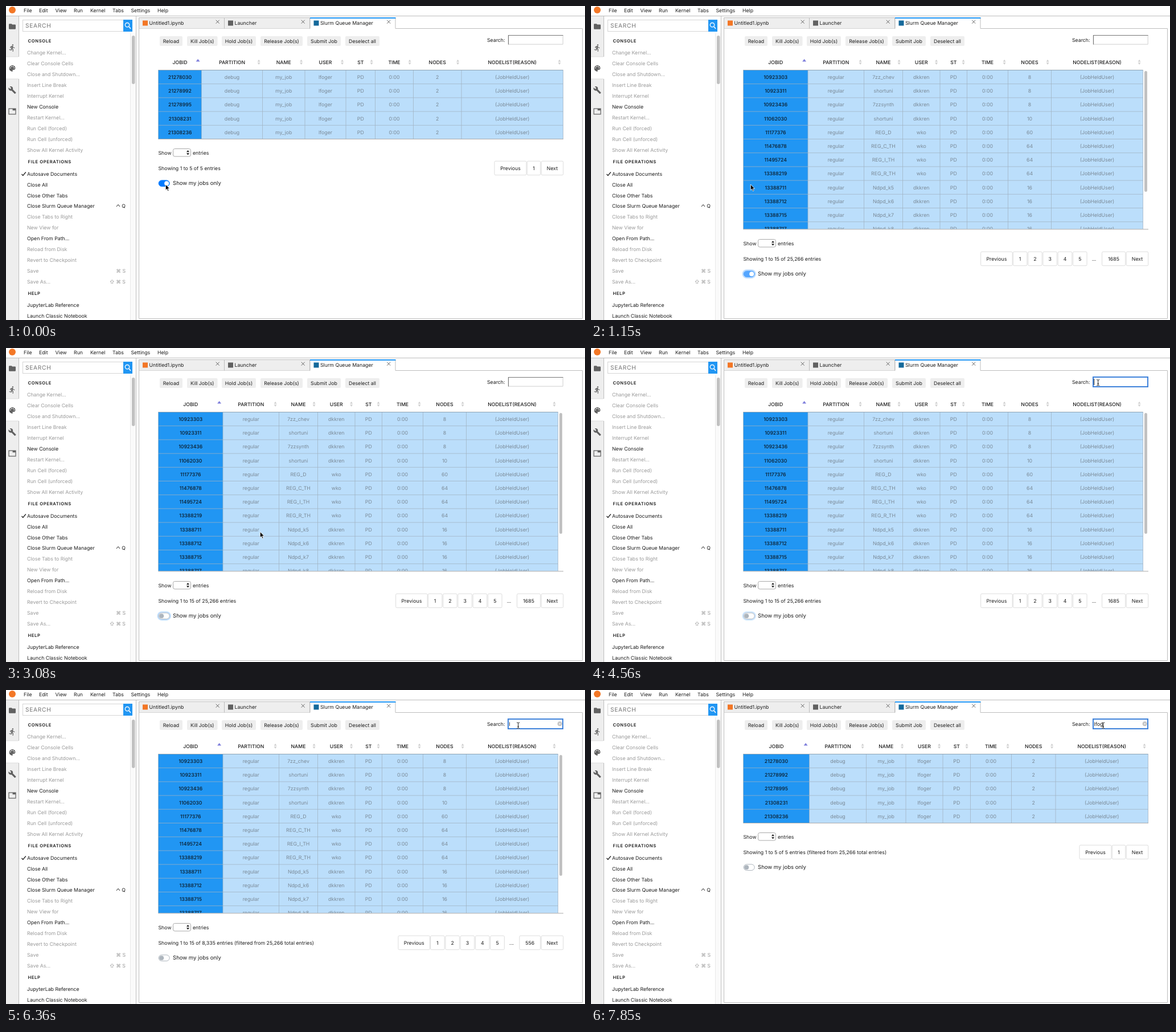
An HTML page that plays this animation: 1017 by 551 pixels, repeating every 8000 ms.

```html
<!DOCTYPE html>
<html lang="en">
<head>
<meta charset="utf-8">
<title>Slurm Queue Manager</title>
<style>
html, body { margin: 0; width: 100%; height: 100%; overflow: hidden; background: #fff; }
svg { display: block; font-family: Inter, "Liberation Sans", sans-serif; text-rendering: geometricPrecision; white-space: pre; }
</style>
</head>
<body>
<svg width="1017" height="551" viewBox="0 0 1017 551">
  <clipPath id="body"><rect x="267" y="112" width="713" height="279.5"/></clipPath>
  <g id="shell"></g>
  <g id="view"></g>
</svg>
<script>
const INK = '#1c1c1c', DIM = '#999', LINE = '#bdbdbd', BLUE = '#2196f3';
const LOOP = 8000, SIZE = 8.75;

// y is the vertical middle of the text
const text = (x, y, s, { fill = INK, size = SIZE, anchor = 'start', weight = 400, gap = 0 } = {}) =>
  `<text x="${x}" y="${y + size * .363}" fill="${fill}" font-size="${size}" font-weight="${weight}" text-anchor="${anchor}" letter-spacing="${gap}">${s}</text>`;
const mid = (x, y, s, opt) => text(x, y, s, { anchor: 'middle', ...opt });
const rect = (x, y, w, h, fill, more = '') =>
  `<rect x="${x}" y="${y}" width="${w}" height="${h}" fill="${fill}" ${more}/>`;
const path = (d, fill, more = '') => `<path d="${d}" fill="${fill}" ${more}/>`;
const line = (d, stroke = LINE, width = 1, more = '') =>
  path(d, 'none', `stroke="${stroke}" stroke-width="${width}" ${more}`);
const dot = (x, y, r, fill) => `<circle cx="${x}" cy="${y}" r="${r}" fill="${fill}"/>`;
const at = (x, y, s, k = 1) => `<g transform="translate(${x} ${y}) scale(${k})">${s}</g>`;
const icon = (x, y, s, k = .6) => at(x - 12 * k, y - 12 * k, s, k);

function menuBar() {
  const items = [[31, 'File'], [58, 'Edit'], [86.5, 'View'], [119, 'Run'], [148, 'Kernel'],
    [187, 'Tabs'], [219.5, 'Settings'], [266, 'Help']];
  return dot(11, 7, 6, '#f37726') + items.map(([x, s]) => text(x, 7.6, s)).join('') + line('M0 17.5H1017');
}

function activityBar() {
  const c = '#616161';
  const holes = [[6.5, 10.5], [9.5, 6.5], [14.5, 6.5], [17.5, 10.5]].map(([x, y]) => dot(x, y, 1.5, '#fff')).join('');
  return rect(0, 18, 22, 533, '#eee') + rect(0, 89, 23, 39, '#fff') +
    line('M22.5 18V89M22.5 128V551') + line('M0 89H22M0 128H22', '#ddd') +
    icon(11, 36, path('M10 4H4a2 2 0 0 0-2 2v12a2 2 0 0 0 2 2h16a2 2 0 0 0 2-2V8a2 2 0 0 0-2-2h-8z', c)) +
    icon(11, 73.5, dot(13.5, 3.5, 2, c) + path('M9.9 19.4l1-4.4 2.1 2v6h2v-7.5l-2.1-2 .6-3c1.3 1.5 3.3 2.5 5.5 2.5v-2c-1.9 0-3.5-1-4.3-2.4l-1-1.6c-.4-.6-1-1-1.7-1-.3 0-.5.1-.8.1L6 8.3V13h2V9.6l1.8-.7L8.2 17l-4.9-1-.4 2z', c)) +
    icon(11, 109.5, path('M12 3a9 9 0 0 0 0 18c1.3 0 2-1.400 1.100-2.500-.9-1.100-.200-2.500 1.100-2.500H16a5 5 0 0 0 5-5c0-4.400-4-8-9-8z', c) + holes) +
    icon(11, 147.500, path('M22.700 19l-9.100-9.100c.9-2.300.4-5-1.500-6.900-2-2-5-2.400-7.400-1.300L9 6 6 9 1.600 4.700C.4 7.100.9 10.100 2.900 12.100c1.900 1.900 4.600 2.400 6.900 1.500l9.100 9.100c.4.4 1 .4 1.400 0l2.300-2.300c.5-.4.5-1.100.1-1.400z', c)) +
    icon(11, 185, path('M1 3h22v18H1zM3 5v14h18V9h-8V5z', c, 'fill-rule="evenodd"'));
}

// A leading "-" marks a disabled command
function palette() {
  const groups = [
    ['CONSOLE', 61, 82, ['-Change Kernel...', '-Clear Console Cells', '-Close and Shutdown...',
      '-Insert Line Break', '-Interrupt Kernel', 'New Console', '-Restart Kernel...',
      '-Run Cell (forced)', '-Run Cell (unforced)', '-Show All Kernel Activity']],
    ['FILE OPERATIONS', 273, 294.5, ['Autosave Documents', 'Close All', 'Close Other Tabs',
      'Close Slurm Queue Manager', '-Close Tabs to Right', '-New View for', 'Open From Path...',
      '-Reload from Disk', '-Revert to Checkpoint', '-Save', '-Save As...']],
    ['HELP', 504, 525, ['JupyterLab Reference', 'Launch Classic Notebook']],
  ];
  const keys = { anchor: 'end', fill: DIM };
  let s = rect(29.5, 24.500, 177, 20, '#fff', 'stroke="#d5d5d5"') +
    text(34, 34.5, 'SEARCH', { fill: '#757575', size: 10.2, gap: .7 }) +
    rect(206, 24, 16, 21, BLUE) +
    line('M215.8 36.300L219 39.800', '#fff', 1.5) + `<circle cx="213" cy="33.2" r="3.700" fill="none" stroke="#fff" stroke-width="1.300"/>`;
  for (const [title, ty, y, items] of groups) {
    s += text(38.5, ty, title, { size: 7.6, weight: 600, gap: .68 });
    items.forEach((item, i) => {
      const off = item[0] === '-';
      s += text(37, y + i * 18.93, off ? item.slice(1) : item, { fill: off ? DIM : INK });
    });
  }
  return s + line('M27.500 295l2.300 2.500 5-6', INK, 1.200) +
    line('M194 352l3-3.500 3 3.500', INK) + text(210, 351.3, 'Q', { anchor: 'end' }) +
    text(210, 464.900, '⌘ S', keys) + text(210, 483.800, '⇧ ⌘ S', keys) +
    rect(219, 48, 9, 503, '#fafafa') + line('M218.5 48V551', '#e8e8e8') +
    rect(221, 52, 5.5, 85, '#c1c1c1', 'rx="2.700"') + line('M228.5 18V551');
}

function tabs() {
  const list = [[233.5, 'Untitled1.ipynb', '#f37726'], [383.5, 'Launcher', '#616161'], [534, 'Slurm Queue Manager', '#15699b']];
  return line('M233.5 39V548.5H1012.5V39.5H233') + list.map(([x, s, c], i) => {
    const on = i === 2;
    return rect(x, 20.5, 150, on ? 20 : 19, on ? '#fff' : '#eee') +
      line(`M${x} 39.5V20.5H${x + 150}V39.5`) + (on ? rect(x, 20, 150.500, 2, BLUE) : '') +
      rect(x + 6.500, 25.500, 9, 9, c) + text(x + 18, 30, s) +
      line(`M${x + 135.200} 24.700l6 6m0-6l-6 6`, '#555', .9);
  }).join('');
}

function toolbar() {
  const buttons = [[270, 40, 'Reload'], [318, 53.5, 'Kill Job(s)'], [379, 60, 'Hold Job(s)'],
    [447, 74, 'Release Job(s)'], [529, 59, 'Submit Job'], [596, 60, 'Deselect all']];
  return buttons.map(([x, w, s]) => rect(x, 53, w, 17, '#eee', 'rx="2"') + mid(x + w / 2, 61.7, s)).join('') +
    text(845, 60, 'Search:');
}

const heads = ['JOBID', 'PARTITION', 'NAME', 'USER', 'ST', 'TIME', 'NODES', 'NODELIST(REASON)'];
const edges = {
  mine: [267.5, 343.5, 450.5, 525, 597, 648.5, 715.5, 800, 978.5],
  all: [267.5, 381, 479.5, 547.5, 613, 660.5, 732.5, 808.5, 969.5],
  found: [267.5, 383.5, 483.5, 553, 618, 666.5, 738.5, 816, 978.5],
};
const job = (id, queue, name, user, nodes) => [id, queue, name, user, 'PD', '0:00', nodes, '(JobHeldUser)'];
const ownJobs = [21278030, 21278992, 21278995, 21308231, 21308236].map(id => job(id, 'debug', 'my_job', 'lfoger', 2));
const allJobs = [
  [10923303, '7zz_chev', 8], [10923311, 'shortuni', 8], [10923436, '7zzsynth', 8], [11062030, 'shortuni', 10],
  [11177376, 'REG_D', 60], [11476878, 'REG_C_TH', 64], [11495724, 'REG_I_TH', 64], [13388219, 'REG_R_TH', 64],
  [13388711, 'Ndpd_k5', 16], [13388712, 'Ndpd_k6', 16], [13388715, 'Ndpd_k7', 16], [13388717, 'Ndpd_k8', 16],
].map(([id, name, n]) => job(id, 'regular', name, name.startsWith('REG') ? 'wko' : 'dkkren', n));

function table(xs, rows, bottom) {
  const h = 24.2, top = 112.5, end = xs[8], low = top + rows.length * h;
  let head = '', cells = '', grid = '';
  heads.forEach((name, c) => {
    const x = (xs[c] + xs[c + 1]) / 2, sort = xs[c + 1] - 6.4;
    head += mid(x, 98.7, name, { weight: 500, size: 8.7 }) + at(sort, 98.5, c
      ? path('M-2.500 -.8L0 -4.500 2.500 -.8zM-2.500 .8L0 4.500 2.500 .8z', '#d0d0d0')
      : path('M-3.500 -1L0 -5.500 3.500 -1z', '#7d7ddb'));
    rows.forEach((row, r) => cells += mid(x, top + h * (r + .5) + .3, row[c],
      c ? { fill: '#7a8996' } : { fill: '#0c1a26', weight: 500, size: 8.7 }));
  });
  xs.forEach(x => grid += `M${x} ${top}V${low}`);
  rows.forEach((_, r) => grid += `M${xs[0]} ${top + r * h}H${end}`);
  return head + `<g clip-path="url(#body)">` +
    rect(xs[0], top, end - xs[0], low - top, '#bbdefb') + rect(xs[0], top, xs[1] - xs[0], low - top, BLUE) +
    line(grid, '#a0b2c2', 1, 'opacity=".75"') + cells + '</g>' +
    line(`M267.500 112.500H${end}`, '#8fa3b3') + line(`M267.500 ${bottom}H979`, '#aaa');
}

const pageButton = (x, y, w, s) =>
  rect(x - w / 2, y - 12.300, w, 24.500, '#fff', 'rx="2" stroke="#ddd"') + mid(x, y, s);

function pager(y, last) {
  let s = pageButton(959.5, y, 38.5, 'Next');
  if (!last) return s + pageButton(927, y, 23.5, 1) + pageButton(886, y, 56, 'Previous');
  const w = last > 999 ? 41 : 36.7, left = 938.6 - w;
  s += pageButton(left + w / 2, y, w, last) + mid(left - 14, y, '...');
  for (let k = 1; k <= 5; k++) s += pageButton(left - 38.8 - 26.3 * (5 - k), y, 24.5, k);
  return s + pageButton(left - 185.2, y, 55.5, 'Previous');
}

function toggle(y, { fill, knob, on, ring }) {
  return (ring ? rect(266.7, y - 6.800, 22, 13.600, 'none', `rx="6.800" stroke="#007bff" stroke-width="2.400" opacity="${ring}"`) : '') +
    rect(268.2, y - 5.300, 19, 10.600, fill, `rx="5.300" stroke="${on ? fill : '#adb5bd'}"`) +
    dot(on ? 282.2 : 273.2, y, 4, knob) + text(293, y - .6, 'Show my jobs only', { size: 9.55 });
}

function toggleState(t) {
  if (t < 1300) return {
    on: true, knob: '#fff', ring: t < 260 ? 0 : .25,
    fill: t < 860 ? '#007bff' : t < 1150 ? '#2b91ff' : '#55a6ff',
  };
  return { on: false, knob: '#adb5bd', fill: '#fff', ring: t < 4560 ? .25 : t < 4710 ? .2 : 0 };
}

function footer(y, info, last, state) {
  const row = y + 24.500;
  return text(267.5, row, 'Show') + rect(293.5, row - 7, 31, 13.500, '#fff', 'rx="3" stroke="#a9a9a9"') +
    path(`M317 ${row - 1.200}l2.500 -3.300 2.500 3.300zM317 ${row + .8}l2.500 3.300 2.500 -3.300z`, INK) + text(328, row, 'entries') +
    text(267.5, y + 51.5, info) + pager(y + 51.5, last) + toggle(y + 78.2, state);
}

const ctx = document.createElement('canvas').getContext('2d');
ctx.font = '8.9px Inter, "Liberation Sans", sans-serif';

function searchBox(t) {
  const n = [5910, 6500, 6950, 7400].filter(k => t >= k).length;
  const typed = 'lfog'.slice(0, n);
  const caret = [[4560, 5010], [5610, 6360], [6500, 7850]].some(([a, b]) => t >= a && t < b);
  let s = t < 4560
    ? rect(882, 51, 96.5, 16.5, '#fff') + line('M978.200 51V67.200H882', '#cfcfcf') + line('M882.500 67.500V51.500H978.500', '#767676', 1.200)
    : rect(882, 51, 96, 17, '#fff', 'stroke="#3f82da" stroke-width="2"');
  if (n) s += text(883.5, 59.7, typed, { size: 8.9 }) + dot(972.7, 59.3, 4, '#c2c2c2') + line('M971 57.600l3.400 3.400m0-3.400l-3.400 3.400', '#fff', .9);
  if (caret) s += rect(883.3 + ctx.measureText(typed).width, 54, .9, 11, '#111');
  return s;
}

// time, x, y of the pointer
const track = [
  [0, 280.3, 313], [1900, 276, 313.2], [2040, 271.5, 313.7], [2490, 270, 314], [2790, 284, 317],
  [2940, 352, 321.500], [3080, 446.3, 322.5], [3230, 566, 296], [3380, 682, 240], [3520, 770, 180],
  [3660, 828, 128], [3810, 856, 94], [3960, 873, 75], [4110, 890.7, 60.8],
  [4710, 893, 61], [4860, 897, 61.7], [5010, 899.7, 62.3],
];

function pointer(t) {
  const [, x, y] = track.findLast(p => t >= p[0]);
  const beam = 'M-2.500 -5.200Q0 -5.200 0 -4V4Q0 5.200 -2.500 5.200M2.500 -5.200Q0 -5.200 0 -4M0 4Q0 5.200 2.500 5.200M-1.300 1.800H1.300';
  return at(x, y, t < 4110
    ? path('M0 0V10.200L2.400 8 4 11.800 5.700 11.100 4.100 7.400H7.200z', '#000', 'stroke="#fff" stroke-width=".8"')
    : line(beam, '#fff', 1.800, 'opacity=".7"') + line(beam, '#111', .95));
}

function view(t) {
  const all = t >= 1150 && t < 6500, bottom = all ? 391.8 : 233.5;
  const set = t < 1150 ? 'mine' : all ? 'all' : 'found';
  const total = '25,266', filtered = t >= 5910 ? ` (filtered from ${total} total entries)` : '';
  const info = all
    ? `Showing 1 to 15 of ${filtered ? '8,335' : total} entries${filtered}`
    : `Showing 1 to 5 of 5 entries${filtered}`;
  return table(edges[set], all ? allJobs : ownJobs, bottom) +
    (all ? rect(972, 114, 5, 212, '#c1c1c1', 'rx="2.500"') : '') +
    footer(all ? 392 : 233, info, all ? (filtered ? 556 : 1685) : 0, toggleState(t)) +
    searchBox(t) + pointer(t);
}

const $ = id => document.getElementById(id);
$('shell').innerHTML = menuBar() + activityBar() + palette() + tabs() + toolbar();

let shown = '';
function tick() {
  const next = view(performance.now() % LOOP);
  if (next !== shown) $('view').innerHTML = shown = next;
  requestAnimationFrame(tick);
}
tick();
</script>
</body>
</html>
```
